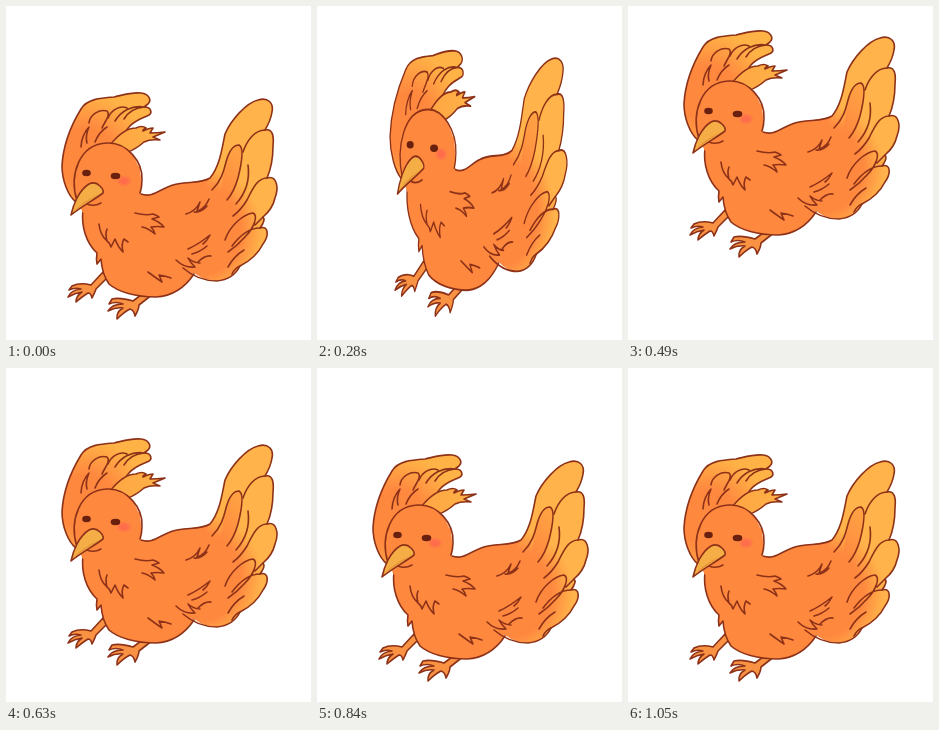
An HTML page that plays this animation: 305 by 334 pixels, repeating every 1120 ms.

```html
<!DOCTYPE html>
<html lang="en">
<head>
<meta charset="utf-8">
<title>Hopping bird</title>
<style>
  html, body { margin: 0; width: 100%; height: 100%; overflow: hidden; background: #fff; }
  svg { display: block; width: 100vw; height: 100vh; }
  .ink { fill: none; stroke: #8d3218; stroke-width: 1.6; stroke-linecap: round; stroke-linejoin: round; }
</style>
</head>
<body>
<svg viewBox="0 0 305 334">
  <defs>
    <radialGradient id="farWing" gradientUnits="userSpaceOnUse" cx="80" cy="150" r="62">
      <stop offset=".45" stop-color="#ff883f"/><stop offset="1" stop-color="#ffb347"/>
    </radialGradient>
    <radialGradient id="nearWing" gradientUnits="userSpaceOnUse" cx="190" cy="225" r="66">
      <stop offset=".68" stop-color="#ff883f"/><stop offset="1" stop-color="#ffb34a"/>
    </radialGradient>
    <linearGradient id="loop" x1="0" y1="1" x2=".4" y2="0">
      <stop offset=".2" stop-color="#ff883f"/><stop offset="1" stop-color="#ffa043"/>
    </linearGradient>
    <linearGradient id="crest" x1="0" y1="0" x2="1" y2="0">
      <stop offset="0" stop-color="#ffa544"/><stop offset="1" stop-color="#ffb347"/>
    </linearGradient>
    <radialGradient id="blush">
      <stop offset=".4" stop-color="#ff6d4b"/><stop offset="1" stop-color="#ff6d4b" stop-opacity="0"/>
    </radialGradient>
  </defs>
  <g id="bird"></g>
</svg>
<script>
const bird = document.getElementById('bird');
const BODY = '#ff883f', GOLD = '#f9b04a';

function add(tag, attrs) {
  const el = document.createElementNS('http://www.w3.org/2000/svg', tag);
  for (const key in attrs) el.setAttribute(key, attrs[key]);
  bird.append(el);
}
const fill = (d, color) => add('path', { d, fill: color });
const ink = (d, color = 'none') => add('path', { d, class: 'ink', style: `fill:${color}` });
const oval = (cx, cy, rx, ry, color) => add('ellipse', { cx, cy, rx, ry, fill: color });

// Far wing and crest
ink('M70 196C62 190 56 174 56 160C57 140 64 121 75 103C81 93 94 92 108 91C117 89 125 86 135 87C143 88 146 94 142 98L138 101C146 101 147 108 141 110C134 113 128 115 123 121L108 140L72 190Z', 'url(#farWing)');
ink('M138 101C126 99 115 105 109 115M138 101C126 102 121 108 118 113M83 117C84 108 94 103 101 105C105 109 99 115 96 122M102 112C105 104 114 99 121 102M75 141C75 133 79 125 83 121Q79 130 81 137M89 136Q93 126 101 121');
ink('M104 139C112 129 121 122 130 122Q136 119 140 122Q136 124 137 125Q143 122 147 122L144 127Q151 127 159 126Q152 129 147 131L154 134Q144 133 138 136Q130 143 122 146Z', 'url(#crest)');

// Feet
ink('M97 266L85 279Q74 276 66 280L63 284Q69 281 75 283Q65 284 62 291Q69 287 76 286Q70 290 70 296Q77 290 82 287Q85 287 86 292Q89 286 90 283L103 270Z', '#f99343');
ink('M139 286L127 295Q114 291 106 293L103 298Q110 295 117 298Q106 298 102 305Q110 301 117 302Q110 306 111 313Q118 306 124 303Q128 304 129 310Q133 303 133 299L147 288Z', '#f99343');

// Body, with the near wing sharing its colour at the shoulder
fill('M77 204C75 220 80 237 91 247L91 258L95 253Q96 268 103 278C112 286 130 291 150 291C168 290 180 280 188 267L212 272L215 180L204 172C190 178 175 174 160 182Q146 191 135 188L134 160L80 165Z', BODY);
fill('M204 172C214 160 216 142 219 128C225 114 240 97 252 94C262 91 268 97 266 106C265 113 262 119 259 124C267 122 268 131 267 140C267 152 265 163 261 172C271 169 273 182 269 192C267 201 263 206 257 211Q260 214 254 222C263 219 263 230 257 238C251 250 242 256 234 260C230 268 222 274 211 275Q199 275 188 267L176 220Z', 'url(#nearWing)');
ink('M135 188C146 192 153 184 164 180C178 174 193 179 204 172C214 160 216 142 219 128C225 114 240 97 252 94C262 91 268 97 266 106C265 113 262 119 259 124C267 122 268 131 267 140C267 152 265 163 261 172C271 169 273 182 269 192C267 201 263 206 257 211Q260 214 254 222C263 219 263 230 257 238C251 250 242 256 234 260C230 268 222 274 211 275Q192 275 177 262');
ink('M77 204C75 220 80 237 91 247Q90 253 91 258L95 253Q96 268 103 278C112 286 130 291 150 291C168 290 180 280 188 268');

// Near wing feathers
fill('M217 172C219 155 224 142 232 139C240 141 235 160 232 172C229 184 222 193 213 198Z', 'url(#loop)');
ink('M206 184C216 174 218 164 220 156C223 145 228 139 233 139C239 142 235 160 232 172Q228 186 221 194');
ink('M259 124C249 124 241 134 237 146M242 159C244 174 239 188 230 198M261 172C251 172 246 184 241 194Q235 204 227 210');
ink('M219 234C224 219 238 208 247 207C253 210 247 223 239 231Q231 240 222 246M254 222C242 222 232 232 226 240M222 261Q228 250 238 244M257 211Q253 215 249 219M234 260Q229 262 226 268');

// Plumage tufts
ink('M93 218Q94 229 101 235Q99 228 101 223M101 235Q104 237 105 241L109 233Q112 241 117 246Q115 238 118 233L122 236');
ink('M129 207Q140 210 147 208Q150 209 153 211L146 213Q154 216 158 221Q151 220 145 221Q148 224 149 228Q142 222 136 221');
ink('M180 208Q190 205 194 196L191 205Q199 203 203 193M188 206Q195 207 201 200');
ink('M182 243Q193 238 204 229Q201 235 197 238M186 248Q194 246 201 240M192 256Q199 249 205 250');
ink('M142 266Q150 272 156 276L153 269Q160 270 165 272M170 254Q178 262 189 261Q184 256 182 252Q188 257 194 257');

// Head
fill('M69 191C65 166 76 139 101 137C123 136 138 157 135 188L110 208L77 207Z', BODY);
ink('M71 195C63 169 73 138 101 137C121 136 137 156 136 174Q136 181 134 187');
oval(118, 175, 8, 6, 'url(#blush)');
oval(80.5, 167, 4.3, 3.2, '#69200f');
oval(109.5, 170, 4.8, 3.2, '#69200f');
ink('M81 198Q88 201 95 197');
ink('M65 209C67 199 73 184 83 178Q89 175 94 180Q98 184 97 187C88 194 76 200 65 209Z', '#f5ae45');
fill('M67 206Q77 195 93 188L95 187Q82 195 67 206Z', '#e9963a');

// One entry per 70 ms: stretch (negative squashes) and height above ground
const STEP = 70;
const POSES = [
  [0, 0], [-.5, 0], [-1, 0], [0, 0], [1, 0], [.5, 43], [0, 68], [0, 62],
  [0, 45], [0, 16], [-.95, 0], [-.5, 0], [0, 0], [0, 0], [0, 0], [0, 0]
];

function draw(time) {
  const [s, lift] = POSES[Math.floor(time / STEP) % POSES.length];
  const sx = 1 - s * (s > 0 ? .177 : .14);
  const sy = 1 + s * (s > 0 ? .173 : .145);
  bird.setAttribute('transform',
    `translate(${163.5 - 2 * s} ${313 - 3 * s - lift}) scale(${sx} ${sy}) translate(-163.5 -313)`);
}

const start = performance.now();
function tick() {
  draw(performance.now() - start);
  requestAnimationFrame(tick);
}
tick();
</script>
</body>
</html>
```
